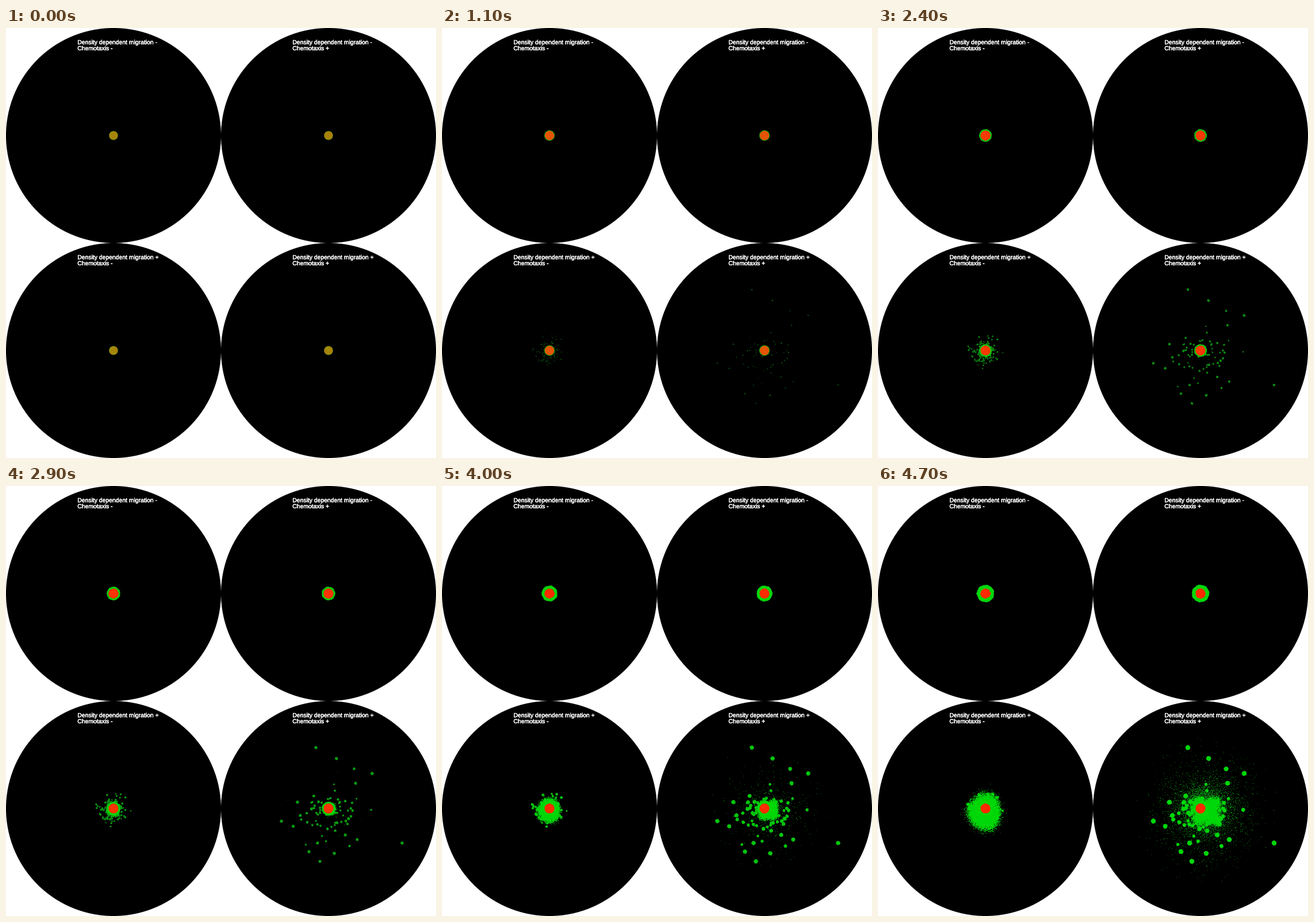
Recreate the animation shown at these times as a matplotlib script. Size 748x748 px, loop 4800 ms.

```python
import numpy as np
import matplotlib.pyplot as plt
from matplotlib.animation import FuncAnimation
from matplotlib.patches import Circle
from matplotlib.patheffects import withStroke

SIZE, HALF, DPI = 748, 374, 100
FRAMES, STEP = 48, 100
END = 4.7
GREEN = np.array([0, 215, 8]) / 255
TINT = np.array([50, 0, 55]) / 255

rng = np.random.default_rng(12)
yy, xx = np.mgrid[0:SIZE, 0:SIZE] + 0.5
noise = rng.uniform(1e-4, 1 - 1e-4, (SIZE, SIZE))
logit = np.log(noise / (1 - noise))

CORES = [(cx, cy) for cy in (187, 561) for cx in (187, 561)]
# The most distant colonies of the chemotactic panel
OUTPOSTS = [(539, 455), (575, 474), (637, 500), (608, 517), (507, 550),
            (512, 573), (479, 583), (527, 636), (542, 621), (571, 639),
            (590, 607), (611, 615), (689, 621), (546, 653)]


def make_seeds():
    """Colonies as x, y, final radius and time of birth."""
    seeds = [(x, y, 4.2, rng.uniform(0.1, 0.7)) for x, y in OUTPOSTS]
    for _ in range(70):
        x, y = rng.normal((568, 571), (30, 24))
        seeds.append((x, y, rng.uniform(2.6, 4.2), rng.uniform(0.1, 1.5)))
    for _ in range(140):
        a, r = rng.uniform(0, 2 * np.pi), min(9 + rng.exponential(6.5), 31)
        seeds.append((186 + r * np.cos(a), 564 + r * np.sin(a),
                      rng.uniform(1.7, 3), rng.uniform(0.1, 1.3)))
    return seeds


SEEDS = make_seeds()


def window(x, y, half):
    x, y = int(x), int(y)
    return np.s_[y - half:y + half, x - half:x + half]


def disc(x, y, r, box, rough=0.8):
    d = np.hypot(xx[box] - x, yy[box] - y)
    return np.clip(r - d + 0.5 + rough * (noise[box] - 0.5), 0, 1)


def add(field, box, value):
    field[box] = np.maximum(field[box], value)


def add_colonies(field, t):
    glow = min(0.22 + 0.18 * t, 1)
    for x, y, r, born in SEEDS:
        if t > born:
            box = window(x, y, 8)
            size = 0.4 + (r - 0.4) * (t - born) / (END - born)
            add(field, box, glow * disc(x, y, size, box))


def add_body(field, t, cx, drift, reach, lobes, depth, stretch):
    """Dense mass that spreads from a core with a fuzzy, lobed edge."""
    grow = (t / END) ** 3.3
    box = window(cx, 561, 90)
    dx = xx[box] - cx - drift[0] * grow
    dy = (yy[box] - 561 - drift[1] * grow) / (1 + stretch * grow)
    wave = 1 - depth * grow * np.cos(lobes * np.arctan2(dy, dx))
    edge = (7.5 + reach * grow) * wave
    s = (edge - np.hypot(dx, dy)) / (0.5 + 1.7 * grow) - 0.8 * logit[box]
    add(field, box, np.where(s > 0, np.clip(0.35 + 0.4 * s, 0, 1), 0))


def add_dust(field, t):
    """Single cells whose number grows exponentially with time."""
    box = window(561, 561, 140)
    d = np.hypot(xx[box] - 568, yy[box] - 564)
    age = t - END + 0.33 * (np.log(4.5 / noise[box]) - d / 16.5)
    lit = (age > 0) & (d < 130)
    add(field, box, np.where(lit, np.clip(0.25 + 0.7 * age, 0, 1), 0))


def render(t):
    field = np.zeros((SIZE, SIZE))
    if t > 0:
        add_colonies(field, t)
        add_body(field, t, 187, (-1.5, 6), 23, 3, 0.04, 0.12)
        add_body(field, t, 561, (11, 5), 21, 4, 0.2, 0)
        add_dust(field, t)
    ring = 7.7 + 1.1 * t + 0.1 * t * t
    for cx, cy in CORES:
        box = window(cx, cy, 20)
        a = np.arctan2(yy[box] - cy, xx[box] - cx)
        r = min(ring, 13 if cy > HALF else ring) + 0.06 * t * np.sin(7 * a + cx)
        add(field, box, disc(cx, cy, r, box, 0.2 * t) * min(0.8 + 0.06 * t, 1))

    rgba = np.empty((SIZE, SIZE, 4))
    rgba[..., :3] = GREEN + (1 - field[..., None]) * TINT
    rgba[..., 3] = field
    base = np.array([255 - 88 * np.exp(-t / 0.9),
                     36 + 97 * np.exp(-t / 1.6), 10 * np.exp(-t / 2)])
    for cx, cy in CORES:
        box = window(cx, cy, 14)
        cover = disc(cx, cy, min(7.7 + 0.4 * t, 8.6), box, 0.3 * t)
        swing = 50 * np.exp(-t / 1.6) * (noise[box] - 0.5)
        color = base + swing[..., None] * np.array([1, -1, 0])
        color = np.clip(color / 255, 0, 1)
        part = rgba[box]
        part[..., :3] += cover[..., None] * (color - part[..., :3])
        part[..., 3] = np.maximum(part[..., 3], cover)
    return np.clip(rgba, 0, 1)


fig = plt.figure(figsize=(SIZE / DPI, SIZE / DPI), dpi=DPI, facecolor="white")
ax = fig.add_axes([0, 0, 1, 1])
ax.axis("off")

for cx, cy in CORES:
    ax.add_patch(Circle((cx, cy), 187, color="black", lw=0))
    lines = ("Density dependent migration " + "-+"[cy > HALF],
             "Chemotaxis " + "-+"[cx > HALF])
    for k, line in enumerate(lines):
        ax.text(cx - 62.7, cy - 158.8 + 10.5 * k, line, color="white",
                family="Liberation Sans", size=10.4 * 72 / DPI,
                va="baseline", zorder=5,
                path_effects=[withStroke(linewidth=0.3, foreground="white")])

cells = ax.imshow(render(0), extent=(0, SIZE, SIZE, 0), aspect="auto",
                  interpolation="nearest", zorder=3)
ax.set_xlim(0, SIZE)
ax.set_ylim(SIZE, 0)


def update(i):
    cells.set_data(render(i * STEP / 1000))
    return (cells,)


anim = FuncAnimation(fig, update, frames=FRAMES, interval=STEP,
                     repeat=True, repeat_delay=0)
plt.show()
```
